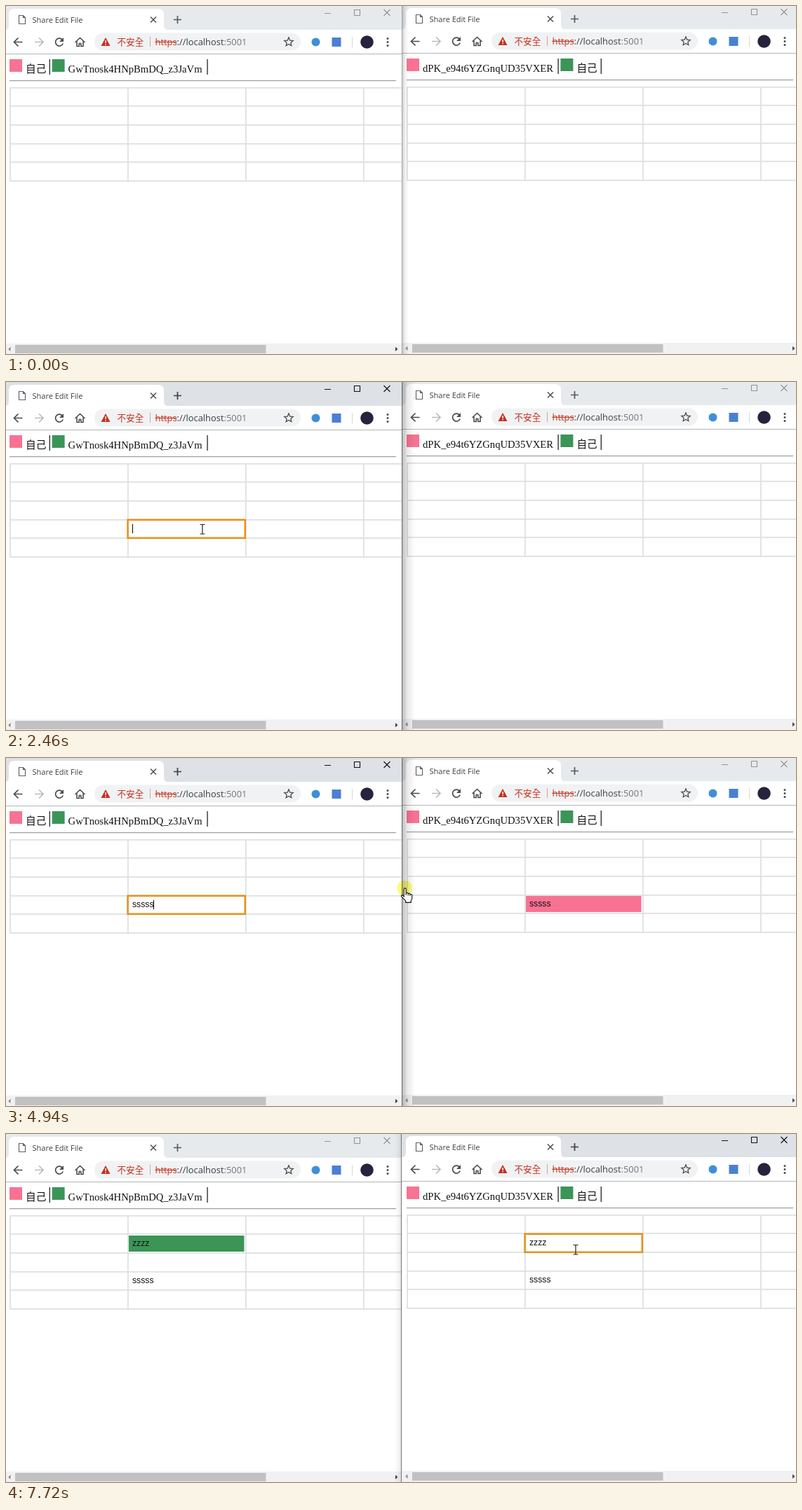
Recreate the animation shown at these times as an HTML page with a canvas. Size 1126 by 497 pixels, loop 8 s.

```html
<!DOCTYPE html>
<html lang="zh-Hant">
<head>
<meta charset="utf-8">
<title>Share Edit File</title>
<style>
html, body { margin: 0; width: 100%; height: 100%; overflow: hidden; background: #fff; }
canvas { display: block; }
</style>
</head>
<body>
<canvas id="stage" width="1126" height="497"></canvas>
<script>
const W = 1126, H = 497, LOOP = 8000;
const g = document.getElementById('stage').getContext('2d');
const PINK = '#f87293', GREEN = '#3b9557', ICON = '#4a4d51', RED = '#c5301f';
const UI = '"Open Sans", "Noto Sans", "Noto Sans CJK TC", "Noto Sans CJK SC", sans-serif';
const CJK = '"Noto Sans CJK TC", "Noto Sans CJK SC", "Noto Sans CJK", sans-serif';
const SERIF = '"Liberation Serif", serif';
const ARIAL = '"Liberation Sans", sans-serif';
const ROW = 26.6, TABLE_TOP = 116;

const rect = (x, y, w, h, color) => { g.fillStyle = color; g.fillRect(x, y, w, h); };

function text(str, x, y, size, family, color) {
  g.font = `${size}px ${family}`;
  g.fillStyle = color;
  g.fillText(str, x, y);
  return x + g.measureText(str).width;
}

// Draws an SVG path moved to (x, y), filled and/or stroked.
function shape(d, x, y, { fill, stroke, width = 1 }) {
  g.save();
  g.translate(x, y);
  const path = new Path2D(d);
  if (fill) { g.fillStyle = fill; g.fill(path); }
  if (stroke) { g.strokeStyle = stroke; g.lineWidth = width; g.stroke(path); }
  g.restore();
}

function circle(x, y, r, color) {
  g.fillStyle = color;
  g.beginPath();
  g.arc(x, y, r, 0, 7);
  g.fill();
}

function star(x, y, r) {
  let d = '';
  for (let i = 0; i < 10; i++) {
    const a = i * Math.PI / 5, s = i % 2 ? r * 0.46 : r;
    d += `${i ? 'L' : 'M'}${Math.sin(a) * s} ${-Math.cos(a) * s}`;
  }
  shape(d + 'Z', x, y, { stroke: ICON, width: 1.3 });
}

function titleBar(active) {
  rect(-3, 0, 570, 35, active ? '#dee1e6' : '#e7eaed');
  shape('M-4 35q8 0 8-8v-15q0-8 8-8h205q8 0 8 8v15q0 8 8 8z', 0, 0, { fill: '#fff' });
  shape('M.5 .5h6l3 3v9h-9zM6.5 .5v3h3', 18, 13, { stroke: '#5f6368', width: 1.2 });
  text('Share Edit File', 37.5, 23.5, 11, UI, '#3c4043');
  shape('M-4-4l8 8M4-4l-8 8', 210, 19.5, { stroke: '#4a4d51', width: 1.5 });
  shape('M-5.5 0h11M0-5.5v11', 244.5, 19.5, { stroke: active ? '#3c4043' : '#55595e', width: 1.7 });
  const control = active ? '#111' : '#929497';
  shape('M454 10.5h9M496.5 5.5h8v8h-8zM538.5 5l9 9M547.5 5l-9 9', 0, 0, { stroke: control, width: 1.1 });
}

function toolbar() {
  rect(-3, 34, 570, 34, '#fff');
  const arrow = 'M6 0h-12M0-6l-6 6 6 6';
  shape(arrow, 17.5, 51.5, { stroke: ICON, width: 1.7 });
  shape('M-6 0h12M0-6l6 6-6 6', 47, 51.5, { stroke: '#b9bbbe', width: 1.7 });
  shape('M4.2-3.6A5.5 5.5 0 1 0 5.2 2', 76, 51.5, { stroke: ICON, width: 1.7 });
  shape('M6-6.5v6h-6z', 76, 51.5, { fill: ICON });
  shape('M-7 .5L0-6 7 .5M-4.5-1v7h3.2v-4h2.6v4h3.2v-7', 105.5, 51.5, { stroke: ICON, width: 1.6 });

  g.fillStyle = '#f0f2f3';
  g.beginPath();
  g.roundRect(126, 38.5, 294, 25, 12.5);
  g.fill();
  shape('M0-6L6.5 6h-13z', 142, 51, { fill: RED });
  rect(141.3, 49, 1.5, 4, '#fff');
  rect(141.3, 54, 1.5, 1.5, '#fff');
  text('不安全', 158.5, 55.5, 12.6, CJK, RED);
  rect(205, 44, 1, 14, '#d5a19c');
  const schemeEnd = text('https', 212.5, 56, 12.9, UI, RED);
  rect(212.5, 51, schemeEnd - 212.5, 1, RED);
  const hostEnd = text('://localhost', schemeEnd, 56, 12.9, UI, '#3c4043');
  text(':5001', hostEnd, 56, 12.9, UI, '#74787c');
  star(403, 51.5, 6.5);

  circle(441.5, 51.5, 6, '#3f8fd8');
  rect(464.5, 45, 13, 13, '#4a80d4');
  rect(493, 44, 1, 15, '#d6d8da');
  circle(514.5, 51.5, 9.3, '#29223c');
  for (const y of [46.5, 51.5, 56.5]) circle(544, y, 1.5, ICON);
  rect(-3, 68, 570, 1, '#b2b4b6');
}

function members(first, second) {
  rect(5, 76, 18, 18, PINK);
  rect(first.bar, 76, 1.4, 22, '#333');
  rect(first.bar + 4, 76, 18, 18, GREEN);
  rect(second.bar, 76, 1.4, 22, '#333');
  const label = (m, x) => m.id
    ? text(m.id, x, 94.5, 14.64, SERIF, '#111')
    : text('自己', x, 95, 14.64, CJK, '#111');
  label(first, 28);
  label(second, first.bar + 27);
  rect(5, 106, 551, 1, '#9b9b9b');
  rect(5, 107, 551, 1, '#ededed');
}

function table(cells) {
  for (let r = 0; r < 6; r++) rect(5, Math.round(TABLE_TOP + r * ROW - 0.3), 560, 1.8, '#dee1e4');
  for (let c = 0; c < 4; c++) rect(5 + c * 168, TABLE_TOP, 1.8, 134, '#dee1e4');

  for (const { row, value, fill, focus, caret } of cells) {
    const top = TABLE_TOP + row * ROW;
    if (fill) rect(175, Math.round(top + 2), 164.5, 23, fill);
    const end = text(value, 180, Math.round(top + 17.6), 12.2, ARIAL, '#111');
    if (focus) {
      g.strokeStyle = '#e6921a';
      g.lineWidth = 2.6;
      g.strokeRect(173.6, Math.round(top) + 0.8, 167.2, 26);
    }
    if (caret) rect(Math.floor(end), Math.round(top + 7), 1, 13, '#000');
  }
}

function scrollBar() {
  rect(-3, 482, 570, 18, '#f1f1f1');
  rect(13, 484, 357.5, 12, '#c1c1c1');
  shape('M3-3.2v6.4L-.4 0z', 3.5, 490, { fill: '#8f8f8f' });
  shape('M0-3.2v6.4L3.4 0z', 555, 490, { fill: '#444' });
}

function browser(x, y, clipLeft, clipRight, active, first, second, cells) {
  g.save();
  g.beginPath();
  g.rect(clipLeft, 0, clipRight - clipLeft, H);
  g.clip();
  g.translate(x, y);
  rect(-3, 0, 570, H + 1, '#fff');
  titleBar(active);
  toolbar();
  members(first, second);
  table(cells);
  scrollBar();
  g.restore();
}

function shadow(from, to, alpha) {
  const fade = g.createLinearGradient(from, 0, to, 0);
  fade.addColorStop(0, `rgba(0,0,0,${alpha})`);
  fade.addColorStop(0.4, `rgba(0,0,0,${alpha * 0.35})`);
  fade.addColorStop(1, 'rgba(0,0,0,0)');
  rect(Math.min(from, to), 0, Math.abs(to - from), H, fade);
}

const smooth = p => p * p * (3 - 2 * p);
const easeOut = p => 1 - (1 - p) ** 2;
const moves = [
  { start: 590, end: 1010, steps: 10, from: [941, 470], to: [322, 220], ease: easeOut },
  { start: 1190, end: 1290, steps: 3, from: [322, 220], to: [317, 212], ease: smooth },
  { start: 1340, end: 1650, steps: 7, from: [317, 212], to: [316, 289], ease: smooth },
  { start: 1800, end: 2110, steps: 6, from: [316, 289], to: [278, 209], ease: smooth },
  { start: 2460, end: 2461, steps: 2, from: [280, 210], to: [280, 210], ease: smooth },
  { start: 4480, end: 5250, steps: 16, from: [280, 209], to: [804, 167], ease: smooth },
  { start: 5300, end: 5530, steps: 5, from: [804, 167], to: [812, 165], ease: smooth },
];

function pointer(t) {
  const m = moves.findLast(m => t >= m.start);
  if (!m) return;
  const n = m.steps - 1;
  const k = Math.min(n, Math.floor((t - m.start) / (m.end - m.start) * n + 1e-6));
  const p = m.ease(k / n);
  const [x, y] = m.from.map((a, i) => a + (m.to[i] - a) * p);

  const inFocusedCell = t >= 5530 || (t >= 2460 && x < 341 && y > 196);
  if (inFocusedCell) {
    shape('M-3.5-6.5h2.5q1 0 1 1q0-1 1-1h2.5M0-6v12.5M-3.5 7h2.5q1 0 1-1q0 1 1 1h2.5', Math.round(x), Math.round(y), { stroke: '#222', width: 1.2 });
    return;
  }
  g.globalCompositeOperation = 'multiply';
  circle(x, y, 11, '#fdfd80');
  g.globalCompositeOperation = 'source-over';
  const look = { fill: '#fff', stroke: '#111', width: 1.1 };
  if (y > 115 && y < 250) {
    shape('M-1 12V1.5q0-1.5 1.5-1.5t1.5 1.5V7q3-1 3 .8q2.8-1 2.8 1q2.7-.6 2.7 1.6v4q0 2-1.5 3.6v2.5H1.5V18L-4 12.5q-1.5-2 .5-2.5q1 0 2.5 2zM2 7v3M5 8v2.5M7.8 9v2', x, y, look);
  } else {
    shape('M0 0v14l3.3-3 2.5 5.5 2.2-1-2.5-5.2H10z', x, y, look);
  }
}

const count = (times, t) => times.filter(s => t >= s).length;
const leftKeys = [3130, 3280, 3410, 3640, 3790];
const rightKeys = [5810, 6090, 6980, 7210];

// The caret restarts its blink at focus and at every key.
function caretOn(t, focusTime, keys) {
  const last = [focusTime, ...keys].findLast(s => t >= s);
  return last !== undefined && (t - last) % 1020 < 510;
}

function draw(t) {
  const leftActive = t >= 1800 && t < 5250;
  const rightOnTop = t >= 5250;
  const rightActive = t >= 5300;
  const leftFocus = t >= 2310 && t < 5250;
  const rightFocus = t >= 5415;
  const typedS = 's'.repeat(count(leftKeys, t));
  const typedZ = 'z'.repeat(count(rightKeys, t));
  const sentS = t >= 4100 ? 'sssss' : '';
  const sentZ = t >= 7520 ? 'zzzz' : t >= 6370 ? 'zz' : '';
  const seam = rightOnTop ? 563 : 564;

  browser(0, 0, 0, seam, leftActive,
    { bar: 61.6 }, { id: 'GwTnosk4HNpBmDQ_z3JaVm', bar: 286.4 }, [
      { row: 1, value: sentZ, fill: sentZ && GREEN },
      { row: 3, value: typedS, focus: leftFocus, caret: leftFocus && caretOn(t, 2460, leftKeys) },
    ]);
  browser(566, -1, seam, W, rightActive,
    { id: 'dPK_e94t6YZGnqUD35VXER', bar: 220.4 }, { bar: 281.6 }, [
      { row: 1, value: typedZ, focus: rightFocus, caret: rightFocus && caretOn(t, 5530, rightKeys) },
      { row: 3, value: sentS, fill: sentS && !rightFocus && PINK },
    ]);

  if (rightOnTop) shadow(563, 553, 0.1);
  else if (leftActive) shadow(565, 583, 0.25);
  else shadow(565, 574, 0.18);
  rect(seam, 0, 1, H, rightOnTop ? '#77797c' : leftActive ? '#66686b' : '#a0a2a5');
  pointer(t);
}

function tick() {
  draw(performance.now() % LOOP);
  requestAnimationFrame(tick);
}
tick();
</script>
</body>
</html>
```
